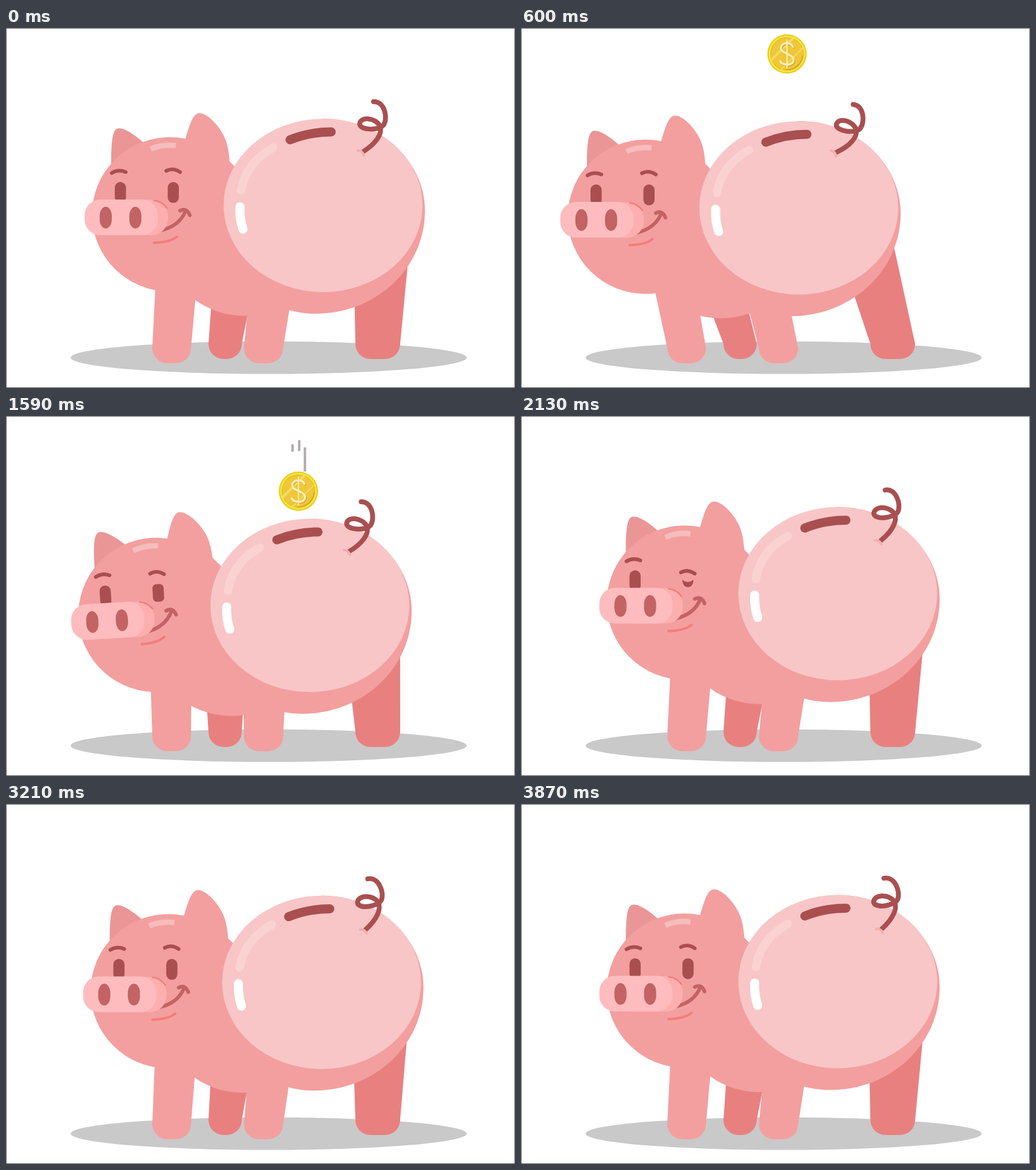
Write an HTML page that moves like this. It is 842 by 596 pixels and loops after 3.9 s.

```html
<!DOCTYPE html>
<html lang="en">
<head>
<meta charset="utf-8">
<title>Piggy bank</title>
<style>
  html, body { margin: 0; width: 100%; height: 100%; overflow: hidden; background: #fff; }
  svg { display: block; width: 842px; height: 596px; }
  .line { fill: none; stroke-linecap: round; stroke-linejoin: round; }
  .flat { stroke-linecap: butt; }
  .dark { stroke: #a94f50; }
  .near { fill: #f39f9f; }
  .far { fill: #e98080; }
</style>
</head>
<body>
<svg viewBox="0 0 842 596">
  <defs>
    <clipPath id="above"><rect id="aboveRect" width="842" height="178"/></clipPath>
    <clipPath id="face"><circle r="29"/></clipPath>
    <path id="dollar" d="M10 -12C7 -20 -10 -20 -10 -10C-10 0 11 0 11 10C11 20 -8 20 -11 12"/>
    <rect id="nostril" y="296" width="20" height="36" rx="10" ry="15"/>
  </defs>

  <ellipse cx="434.5" cy="545.7" rx="327.5" ry="27" fill="#c9c9c9"/>
  <g id="legs"></g>

  <g id="pig">
    <g class="near">
      <ellipse cx="395" cy="360" rx="130" ry="116.5"/>
      <path d="M524 150C617 150 693 219 693 303C693 397 612 473 512 473C420 473 360 400 360 300Z"/>
      <path d="M330 240L360 211L390 241L380 300Z"/>
    </g>

    <g id="head">
      <path fill="#ea9697" d="M174 240V210C175 178 178 166 187 166C198 166 216 179 232 194L220 240Z"/>
      <ellipse class="near" cx="271" cy="308.5" rx="128.7" ry="127.7"/>
      <path class="near" d="M296 186C304 160 309 141 320 141C332 141 351 159 361 180C368 195 369 210 370 222L340 260L296 200Z"/>
      <path class="line flat" stroke="#f7bcbc" stroke-width="9" d="M239.5 200.5Q257 192 281 194.5"/>

      <g class="line dark" stroke-width="6">
        <path d="M175 240Q186 233.5 198 238.5"/>
        <path id="brow" d="M265 236.5Q276 230.5 288 238.5"/>
      </g>
      <g fill="#a94f50">
        <rect id="eyeL" x="180" width="18.5"/>
        <rect id="eyeR" x="267.5" width="18.5"/>
        <path id="wink" d="M267.5 270.5Q276.5 278 285.7 270.5C286.5 287 267 287 267.5 270.5Z"/>
      </g>

      <g class="line" stroke="#c36363" stroke-width="6">
        <path d="M256 335Q287 328 297 303"/>
        <path d="M288 302.5Q299 297 304 310"/>
      </g>
      <rect x="160" y="284.5" width="108" height="58.5" rx="27" fill="#fdafaf"/>
      <rect x="130" y="284" width="121" height="59" rx="26" fill="#ffbcbe"/>
      <g fill="#c36363">
        <use href="#nostril" x="155"/>
        <use href="#nostril" x="204"/>
      </g>
      <g class="line" stroke="#f47c7c">
        <path stroke-width="2.5" d="M245 285.5Q257 286.5 266 298"/>
        <path stroke-width="4" d="M244.5 355.5Q271 355 282.5 345.5"/>
      </g>
    </g>

    <ellipse cx="524.5" cy="293.7" rx="164.5" ry="143.5" fill="#f8c6c7"/>
    <path class="line" stroke="#fad2d2" stroke-width="14" d="M389 269Q397 223 442 198"/>
    <path class="line" stroke="#fff" stroke-width="15" d="M387 296Q386 315 392 333"/>
    <path class="line dark" stroke-width="15" d="M470 185Q503 172 538 172"/>

    <g id="tail" class="line">
      <path class="dark" stroke-width="8" d="M608 122C626 121 632 148 625 160C618 170 586 170 585 159C586 146 612 148 619 163C623 175 612 191 592 204"/>
      <path stroke="#f4aeb0" stroke-width="4" d="M582 203Q590 203 592 211"/>
    </g>
  </g>

  <path id="streaks" class="line flat" stroke="#b3abad" stroke-width="4"/>

  <g clip-path="url(#above)">
    <g id="coin">
      <circle r="32.5" fill="#e6cb1f"/>
      <circle r="30.5" fill="#f6e534"/>
      <circle r="27.5" fill="#dfb52b"/>
      <circle r="26.5" fill="#f0c739"/>
      <path class="line" stroke="#d19a35" stroke-width="1.5" d="M26 3A26 26 0 0 1 -1 26"/>
      <g clip-path="url(#face)" stroke="#f8e172" opacity=".75">
        <path stroke-width="4" d="M-32 16L16 -32"/>
        <path stroke-width="2" d="M-14 30L30 -14"/>
      </g>
      <g class="line" stroke="#fbf0b4" stroke-width="3.5">
        <use href="#dollar" x="1.2" y="1.2" stroke="#d3a02c"/>
        <use href="#dollar"/>
        <path stroke-width="2" d="M0 -23V23"/>
      </g>
    </g>
  </g>

  <path d="M0 .5H842M.5 0V596M841.5 0V596" stroke="#666"/>
  <path d="M0 595.5H842" stroke="#505050"/>
</svg>

<script>
const LOOP = 3900, STEP = 30;
const $ = id => document.getElementById(id);
const put = (id, name, value) => $(id).setAttribute(name, value);
const part = (t, a, b) => Math.max(0, Math.min(1, (t - a) / (b - a)));
const smooth = u => u * u * (3 - 2 * u);
const slowing = u => 1 - (1 - u) ** 2;
// rises over a..b, holds, falls over c..d
const swell = (t, a, b, c, d) => smooth(part(t, a, b)) - smooth(part(t, c, d));

// The pig's pose is the sum of a few moves, each with a start, peak and end.
const step = { x: -65, y: 4, lean: -65, turn: 0 };
const squash = { x: -16, y: 29, lean: -31, turn: 0 };
const nod = { x: -22, y: 20, lean: -20, turn: -3.4 };
const sway = { x: -40, y: 25, lean: -42, turn: 0 };
const MOVES = [
  [step, 0, 600, 1350],
  [squash, 840, 1070, 1350],
  [nod, 1350, 1600, 2180],
  [sway, 2130, 2700, 3300],
  [nod, 3300, 3540, 3900]
];

function pose(t) {
  const p = { x: 0, y: 0, lean: 0, turn: 0 };
  for (const [move, from, peak, to] of MOVES) {
    const u = swell(t, from, peak, peak, to);
    for (const k in p) p[k] += move[k] * u;
  }
  return p;
}

// Feet stay put; the upper end follows the lean over the leg's reach.
function leg(kind, left, right, slopeL, slopeR, reach) {
  const el = document.createElementNS("http://www.w3.org/2000/svg", "path");
  el.setAttribute("class", kind);
  $("legs").append(el);
  const foot = kind === "near" ? 555 : 548, r = 25, c = r * .45, y = foot - r;
  return ({ lean, y: drop }) => {
    const top = 350 + drop, h = y - top, s = lean / reach;
    el.setAttribute("d", `M${left + (slopeL + s) * h} ${top}L${left} ${y}` +
      `C${left} ${foot - c} ${left + c} ${foot} ${left + r} ${foot}H${right - r}` +
      `C${right - c} ${foot} ${right} ${foot - c} ${right} ${y}L${right + (slopeR + s) * h} ${top}Z`);
  };
}

const legs = [
  leg("far", 335, 390, .07, .2, 145),
  leg("far", 578, 652, -.02, .096, 207),
  leg("near", 393.5, 458.5, .1, .16, 180),
  leg("near", 242, 306, .05, .09, 245)
];

function setEye(id, open) {
  const h = 34.5 * open;
  put(id, "height", h);
  put(id, "y", 272.3 - h / 2);
  put(id, "rx", 9 * open * open);
}

function drawFace(t) {
  const open = 1 - .85 * swell(t, 1030, 1165, 1165, 1280);
  const wink = swell(t, 1540, 1740, 2200, 2400);
  const shut = wink > .65;
  setEye("eyeL", open);
  setEye("eyeR", shut ? 0 : open * (1 - wink));
  put("wink", "visibility", shut ? "visible" : "hidden");
  put("brow", "transform", `translate(0 ${22 * wink})`);
}

// Drops in, hits the back, spins up towards the viewer, then falls in the slot.
function drawCoin(t) {
  const enter = smooth(part(t, 280, 560));
  const fall = part(t, 680, 880) ** 2;
  const rise = slowing(part(t, 880, 1080));
  const drop = part(t, 1430, 1700) ** 2;
  const x = 440 + 43.7 * rise;
  const y = -40 + 83 * enter + 100 * fall - 82.5 * rise + 182 * drop;
  const size = 1 + .43 * swell(t, 880, 1080, 1110, 1400);
  const spin = 360 * slowing(part(t, 880, 1345));
  put("coin", "transform", `translate(${x} ${y}) rotate(${spin}) scale(${size})`);
}

// Three lines grow downwards and then shrink; the left one comes last.
function streaks(t, start, x, y) {
  const one = (dx, top, len, delay) => {
    const u = (t - start) / 150 - delay;
    if (u <= 0 || u >= 2) return "";
    return `M${x + dx} ${y + top + len * part(u, 1, 2)}V${y + top + len * part(u, 0, 1)}`;
  };
  return one(-9.5, 47, 24, 1) + one(1.5, 22, 36, 0) + one(11, 12, 80, 0);
}

function draw(t) {
  const p = pose(t);
  put("pig", "transform", `translate(${p.x} ${p.y})`);
  put("head", "transform", `rotate(${p.turn} 286 322)`);
  put("tail", "transform", `rotate(${9 * Math.sin(Math.min(t, 2550) / 1700 * Math.PI)} 607 168)`);
  put("aboveRect", "height", 178 + p.y);
  legs.forEach(move => move(p));
  drawFace(t);
  drawCoin(t);
  put("streaks", "d", streaks(t, 755, 440, 29) + streaks(t, 1365, 483.5, 0));
}

const began = performance.now();
function tick() {
  const t = (performance.now() - began) % LOOP;
  draw(Math.floor(t / STEP) * STEP);
  requestAnimationFrame(tick);
}
tick();
</script>
</body>
</html>
```
